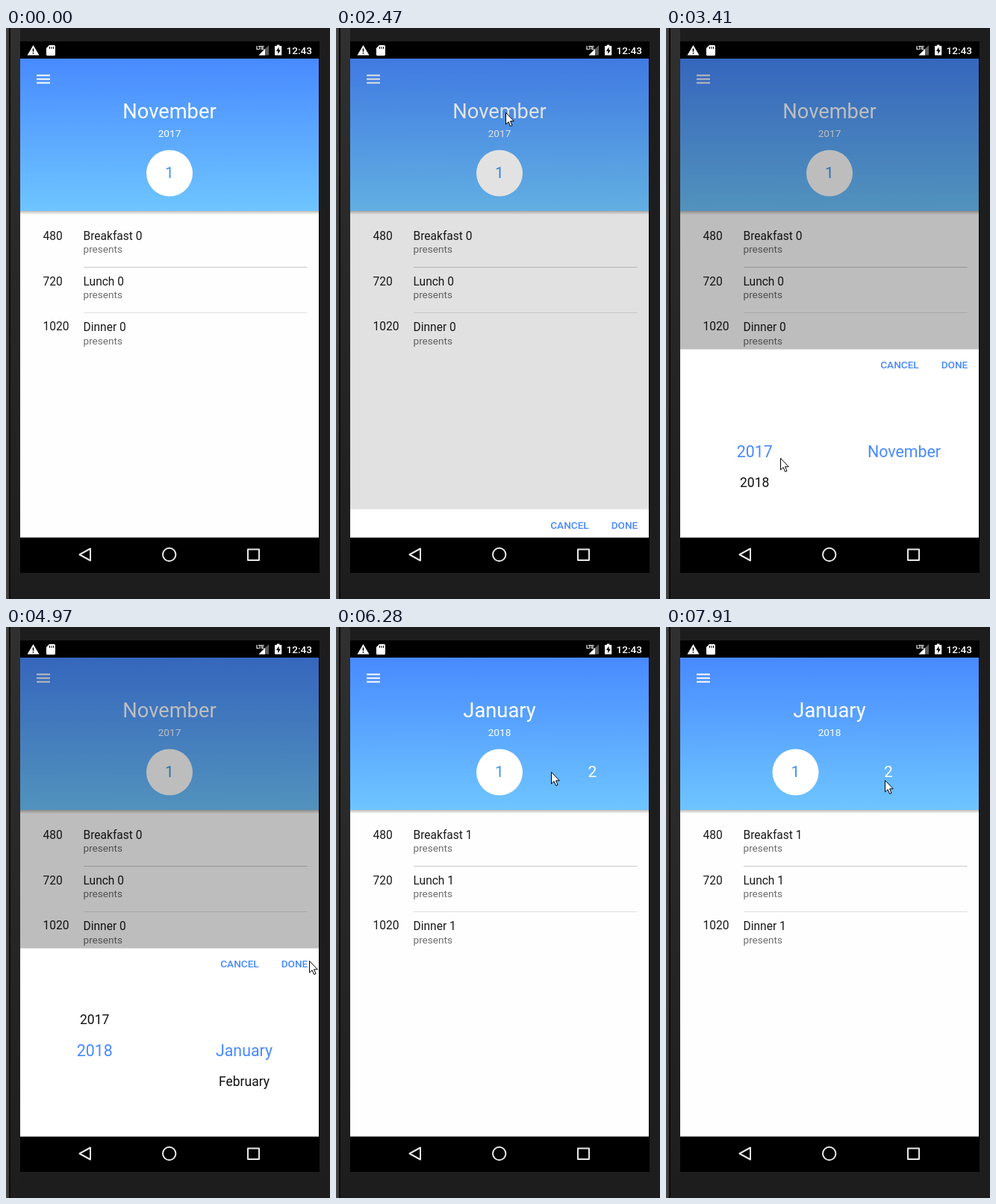
An HTML page that plays this animation: 434 by 765 pixels, repeating every 7990 ms.

```html
<!DOCTYPE html>
<html lang="en">
<head>
<meta charset="utf-8">
<title>Meal calendar</title>
<style>
  html, body { margin: 0; width: 100%; height: 100%; overflow: hidden; background: #1c1c1c; }
  svg { display: block; width: 100%; height: 100%; }
  text { font-family: Roboto, sans-serif; font-size: 15.57px; fill: #1a1a1a; }
  .mid { text-anchor: middle; }
  .white { fill: #fff; }
  .title { font-size: 27.3px; }
  .small { font-size: 13.6px; }
  .sub { font-size: 13.6px; fill: #6c6c6c; }
  .button { font-size: 13.6px; font-weight: 500; fill: #488aff; }
  .day { font-size: 21px; }
</style>
</head>
<body>
<svg viewBox="0 0 434 765">
  <defs>
    <linearGradient id="sky" x2="0" y2="1">
      <stop stop-color="#488aff"/><stop offset="1" stop-color="#6ec5ff"/>
    </linearGradient>
    <linearGradient id="shade" x2="0" y2="1">
      <stop stop-opacity=".27"/><stop offset="1" stop-opacity="0"/>
    </linearGradient>
    <linearGradient id="bezel" x2="0" y2="1">
      <stop stop-color="#303030"/><stop offset="1" stop-color="#1d1d1d"/>
    </linearGradient>
    <linearGradient id="edge">
      <stop stop-color="#484848"/><stop offset="1" stop-color="#363636"/>
    </linearGradient>
    <clipPath id="screen"><path d="M19 41h400v641.5H19z"/></clipPath>
  </defs>

  <!-- Phone body -->
  <path fill="#1d1d1d" d="M0 0h434v765H0z"/>
  <path fill="url(#bezel)" d="M6 0h13v765H6z"/>
  <path fill="url(#edge)" d="M0 0h4v765H0z"/>
  <path fill="#0b0b0b" d="M4 0h2v765H4z"/>
  <path d="M19 18h401v712H19z"/>

  <!-- Status bar -->
  <path fill="#fff" d="M36.5 23L44.5 36.5H28.5z"/>
  <path d="M35.7 27.5h1.6v4.2h-1.6zM35.700 33h1.6v1.6h-1.6z"/>
  <path fill="#fff" d="M58 23h6.500q1.500 0 1.500 1.500v11q0 1.500-1.500 1.500h-9q-1.500 0-1.500-1.500V27z"/>
  <path stroke="#000" d="M58.500 25v3M61 25v3M63.500 25v3"/>
  <text class="white" x="335" y="28.5" style="font-size:7.5px;font-weight:700" letter-spacing="-.6">LTE</text>
  <path fill="#5c5c5c" d="M352 23v13.500h-13.500z"/>
  <path fill="#fff" d="M347 28v8.500h-8.500z"/>
  <path fill="#fff" d="M360 24h2.800v-1.500h3.600V24h2.800v12.500H360z"/>
  <path d="M365.500 25.500l-3.500 5.500h2.300v4l3.500-5.500h-2.300z"/>
  <text class="white small" x="375.5" y="35" font-weight="500">12:43</text>

  <!-- Page -->
  <g clip-path="url(#screen)">
    <path fill="#fefefe" d="M19 41h400v642H19z"/>
    <path fill="url(#shade)" d="M19 245h400v5H19z"/>
    <path fill="url(#sky)" d="M19 41h400v204H19z"/>
    <path stroke="#fff" stroke-width="2" d="M41 63.500h18M41 68.500h18M41 73.500h18"/>
    <text id="month" class="mid white title" x="219" y="121"></text>
    <text id="year" class="mid white small" x="219" y="146"></text>
    <g id="days">
      <circle cx="219" cy="194.500" r="31" fill="#fff"/>
      <text class="mid day" x="219" y="200.500" style="fill:#4395ec">1</text>
      <text id="second" class="mid day white" x="343.3" y="201">2</text>
    </g>
    <g id="meals"></g>
    <path fill="#c9c9c9" d="M104 320h299.500v1H104z"/>
    <path fill="#e2e2e2" d="M104 381h299.500v1H104z"/>

    <path id="backdrop" d="M19 41h400v642H19z"/>
    <g id="sheet">
      <path fill="#fff" d="M19 430.500h400v253H19z"/>
      <text class="mid button" x="313" y="456.300">CANCEL</text>
      <text class="mid button" x="386.500" y="456.300">DONE</text>
      <g id="wheels"></g>
    </g>
  </g>

  <!-- Navigation bar -->
  <g fill="none" stroke="#e8e8e8" stroke-width="2" stroke-linejoin="round">
    <path d="M98.500 705.500L113 697.500v16z"/>
    <circle cx="218.700" cy="705.500" r="8.700"/>
    <path d="M324 698.500h15v14.500h-15z"/>
  </g>

  <path id="cursor" fill="#fff" stroke="#000"
    d="M.5.5v15.500l3.600-3.300 2.500 5.800 2.400-1-2.500-5.700h4.800z"/>
</svg>

<script>
const LOOP = 7990;
const ENTER = 260, OPEN = 2390, CLOSE = 5650, SLIDE = 320;

const $ = id => document.getElementById(id);
const place = (id, x, y) => $(id).setAttribute('transform', `translate(${x} ${y})`);
const progress = (t, from, to) => Math.min(1, Math.max(0, (t - from) / (to - from)));
const ramp = (t, from, to) => (1 - Math.cos(Math.PI * progress(t, from, to))) / 2;

// Pointer moves: start, end, destination
const origin = [363, 642];
const moves = [
  [ENTER, 980, 239, 198], [1130, 1210, 121, 198], [1280, 1600, 209, 139],
  [1600, 2080, 227, 113], [2500, 3260, 153, 576], [3410, 3750, 153, 535],
  [3750, 4190, 275, 540], [4200, 4730, 336, 566], [4820, 4970, 406, 447],
  [5600, 6280, 288, 194], [6360, 6440, 294, 204], [7590, 7910, 338.5, 205]
];

const pointerAt = t => moves.reduce(([x, y], [from, to, toX, toY]) => {
  const p = ramp(t, from, to);
  return [x + (toX - x) * p, y + (toY - y) * p];
}, origin);

// The day strip is dragged out, back, and out again
const dragAt = t => -45.5 * (ramp(t, 6440, 6710) - ramp(t, 6710, 6980) + ramp(t, 7050, 7510));

function column(items, x, position) {
  return items.map((label, i) => {
    const selected = i === Math.round(position);
    const size = selected ? 21.4 : 17.5;
    const y = 567.3 + (i - position) * 41.7 + size * .355;
    return `<text class="mid" x="${x}" y="${y}" style="font-size:${size}px;` +
      `fill:${selected ? '#488aff' : '#111'}">${label}</text>`;
  }).join('');
}

function mealRows(count) {
  return ['Breakfast', 'Lunch', 'Dinner'].map((name, i) => {
    const minute = [480, 720, 1020][i];
    const y = 284 + i * 61.2;
    return `<text x="49.5" y="${284 + i * 60.6}">${minute}</text>` +
      `<text x="103.5" y="${y}">${name} ${count}</text>` +
      `<text class="sub" x="103.5" y="${y + 17.2}">presents</text>`;
  }).join('');
}

function setHtml(id, html) {
  if ($(id).innerHTML !== html) $(id).innerHTML = html;
}

function draw(t) {
  const chosen = t >= CLOSE + SLIDE / 2;
  setHtml('month', chosen ? 'January' : 'November');
  setHtml('year', chosen ? '2018' : '2017');
  setHtml('meals', mealRows(chosen ? 1 : 0));
  $('second').style.display = chosen ? '' : 'none';

  const drag = dragAt(t);
  place('days', drag, 0);

  const [x, y] = pointerAt(t);
  place('cursor', x + drag, y);
  $('cursor').style.display = t < ENTER ? 'none' : '';

  const shown = ramp(t, OPEN, OPEN + SLIDE) - ramp(t, CLOSE, CLOSE + SLIDE);
  const dim = 1 - (1 - progress(t, OPEN, OPEN + SLIDE)) ** 2 - progress(t, CLOSE, CLOSE + SLIDE);
  place('sheet', 0, 252 * (1 - shown));
  $('backdrop').setAttribute('opacity', .26 * dim);

  const position = ramp(t, 3410, 3750);
  const months = position > .5 ? ['January', 'February'] : ['November'];
  setHtml('wheels', column(['2017', '2018'], 118.7, position) + column(months, 319, 0));
}

const start = performance.now();
function tick() {
  draw((performance.now() - start) % LOOP);
  requestAnimationFrame(tick);
}
tick();
</script>
</body>
</html>
```
